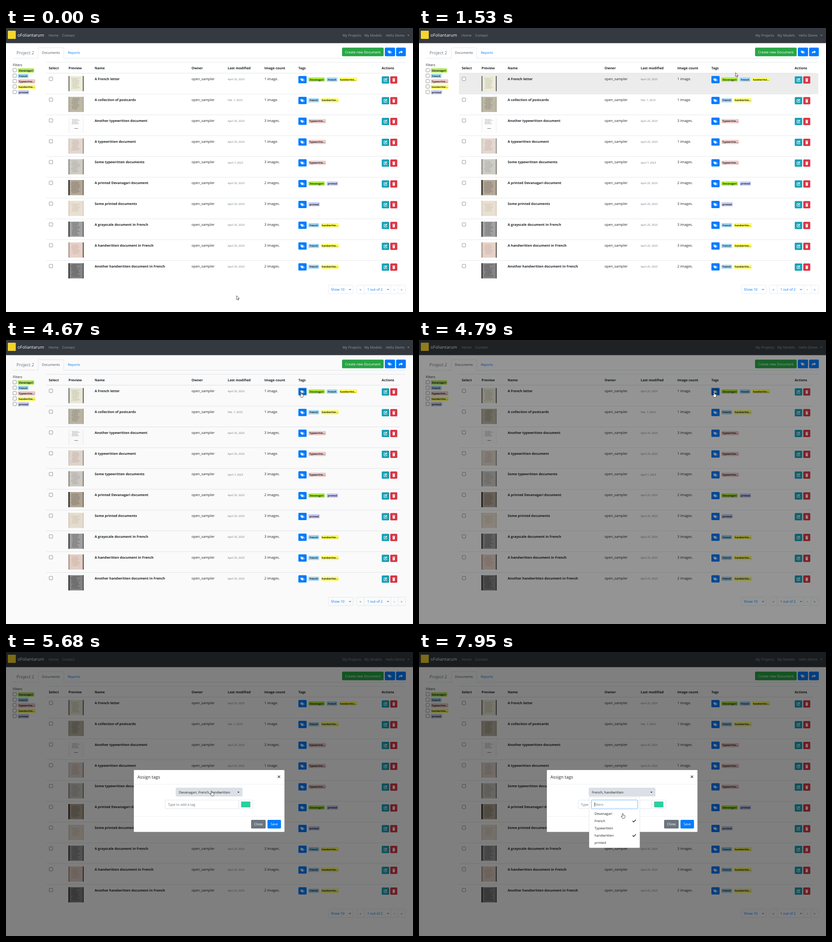
An HTML page for the animation above (8000 ms loop, 895x626 px).

```html
<!DOCTYPE html>
<html lang="en">
<head>
<meta charset="utf-8">
<title>Document list</title>
<style>
html, body { margin: 0; width: 100%; height: 100%; overflow: hidden; background: #fff; }
svg { display: block; width: 895px; height: 626px; font-family: "Open Sans", "Noto Sans", sans-serif; text-rendering: geometricPrecision; }
</style>
</head>
<body>
<svg id="stage" viewBox="0 0 895 626"></svg>
<script>
const LOOP = 8000, ROW_TOP = 99.8, ROW_STEP = 45.85;
const BLUE = '#007bff', INK = '#212529', GREY = '#6c757d', LINE = '#dee2e6';

const TAGS = {
  Devanagari: ['Devanagari', 36, '#ace846'],
  French: ['French', 23.5, '#a2d7f5'],
  Typewritten: ['Typewritte...', 38.5, '#edcaca'],
  handwritten: ['handwritte...', 39, '#fdfd62'],
  printed: ['printed', 25, '#c8cdf5']
};

// title, date, image count, tags, thumbnail [paper, ink, left edge, right edge, first line, last line]
const DOCS = [
  ['A French letter', 'April 25, 2023', 1, ['Devanagari', 'French', 'handwritten'], ['#edecda', '#bdbca4', '#777', '#555', 5, 29]],
  ['A collection of postcards', 'Feb. 7, 2023', 1, ['French', 'handwritten'], ['#bdb7a5', '#8b8677', '#aaa594', '#aaa594', 3, 28]],
  ['Another typewritten document', 'April 25, 2023', 3, ['Typewritten'], ['#fdfdfd', '#aaa', '#f4f4f4', '#f4f4f4', 4, 15]],
  ['A typewritten document', 'April 25, 2023', 1, ['Typewritten'], ['#e3d8cf', '#c3b0aa', '#d3c9c0', '#8f8780', 4, 28]],
  ['Some typewritten documents', 'April 7, 2023', 3, ['Typewritten'], ['#cfccc5', '#aaa9a6', '#8b8983', '#77736d', 4, 29]],
  ['A printed Devanagari document', 'April 25, 2023', 2, ['Devanagari', 'printed'], ['#b3a797', '#7d7469', '#191816', '#6d655c', 4, 29]],
  ['Some printed documents', 'April 25, 2023', 3, ['printed'], ['#e9e0d2', '#cdc1b1', '#d9cdbd', '#d9cdbd', 7, 25]],
  ['A grayscale document in French', 'April 25, 2023', 3, ['French', 'handwritten'], ['#a2a2a2', '#686868', '#343434', '#555', 2, 31]],
  ['A handwritten document in French', 'April 25, 2023', 3, ['French', 'handwritten'], ['#e6d1c7', '#cbb1a8', '#a8948b', '#49423f', 5, 27]],
  ['Another handwritten document in French', 'April 25, 2023', 2, ['French', 'handwritten'], ['#858585', '#515151', '#2d2d2d', '#4a4a4a', 3, 30]]
];

let seed = 7;
const random = () => (seed = seed * 16807 % 2147483647) / 2147483647;

const rect = (x, y, w, h, fill, more = '') =>
  `<rect x="${x}" y="${y}" width="${w}" height="${h}" fill="${fill}" ${more}/>`;
const path = (d, fill, more = '') => `<path d="${d}" fill="${fill}" ${more}/>`;
const stroke = (d, color, width = 1, more = '') => path(d, 'none', `stroke="${color}" stroke-width="${width}" ${more}`);
const text = (x, middle, label, size = 7.6, fill = INK, more = '') =>
  `<text x="${x}" y="${middle + size * 0.36}" font-size="${size}" fill="${fill}" ${more}>${label}</text>`;
const bold = (x, middle, label) => text(x, middle, label, 7.42, INK, 'font-weight="700"');
const centred = (x, middle, label, size, fill) => text(x, middle, label, size, fill, 'text-anchor="middle"');
const at = (x, y, content, more = '') => `<g transform="translate(${x} ${y})" ${more}>${content}</g>`;
const box = (x, y, w, h, more = '') => rect(x, y, w, h, '#fff', `rx="2" stroke="#ced4da" stroke-width=".6" ${more}`);

const tagsIcon = (x, y) => at(x, y,
  path('M-4.5-3h3.2l3.7 3.6-3 3-3.9-3.7z', '#fff') +
  stroke('M.2-3l4 3.8-2.8 2.8', '#fff', 1) +
  '<circle cx="-3" cy="-1.6" r=".7" fill="#007bff"/>');
const editIcon = (x, y) => at(x, y,
  stroke('M1-2.6h-4.2v6.2h6.2v-3', '#fff', 1) + stroke('M-1 1.3l4.4-4.4', '#fff', 1.8));
const trashIcon = (x, y) => at(x, y,
  path('M-3-3.6h2l.5-.7h1l.5.7h2v1h-6zM-2.6-2h5.2l-.4 6h-4.4z', '#fff'));
const shareIcon = (x, y) => at(x, y,
  path('M.5-3.8l4 3.3-4 3.3v-2c-3 0-4 .8-3.9 3-2-3-.8-5.5 3.9-5.6z', '#fff'));
const chevron = (x, y) => stroke(`M${x - 2} ${y - 1}l2 2 2-2`, BLUE, 1.1);
const check = (y, id) => stroke(`M469.6 ${y}l2.4 2.4 4.8-4.9`, INK, 1.5, id ? `id="${id}"` : '');
const checkbox = (x, y) => rect(x, y, 7.6, 7.6, '#fff', 'rx="1.2" stroke="#767676" stroke-width=".8"');

function badge(x, middle, name) {
  const [label, width, color] = TAGS[name];
  return rect(x, middle - 4.6, width, 9.2, color, 'rx="2"') +
    text(x + width / 2, middle, label, 5.5, INK, 'text-anchor="middle" font-weight="700"');
}

function thumbnail(y, [paper, ink, left, right, first, last]) {
  let lines = '';
  for (let row = first; row < last; row += 2) {
    const start = 6 + random() * 4;
    lines += `M${start} ${row}h${(26 - start) * (0.6 + random() * 0.4)}`;
  }
  return at(137.3, y,
    rect(0, 0, 33.5, 33.5, paper) + rect(0, 0, 2.4, 33.5, left) + rect(31.6, 0, 1.9, 33.5, right) +
    stroke(lines, ink, 0.9, 'stroke-dasharray="3 .7 1.8 .6"') +
    (last === 15 ? stroke('M13 24h8', '#777', 1) : ''));
}

function documentRow([title, date, count, tags, thumb], i) {
  const y = ROW_TOP + i * ROW_STEP, middle = y + 12.5;
  let x = 665;
  const badges = tags.map(name => {
    const mark = badge(x, middle + 1.3, name);
    x += TAGS[name][1] + 4.2;
    return mark;
  }).join('');
  return rect(88, y, 790, ROW_STEP, '#ececec', 'class="hover" visibility="hidden"') +
    (i ? stroke(`M88 ${y}H866`, LINE, 0.8) : '') +
    checkbox(95, middle - 4) + thumbnail(y + 6, thumb) +
    bold(195, middle, title) + text(408, middle, 'open_sampler', 7.66) +
    text(487.5, middle + 0.8, date, 5.85, GREY) +
    text(568, middle, count + (count > 1 ? ' images.' : ' image.'), 7.7) +
    rect(643, y + 6, 18, 16, BLUE, `rx="1.6" ${i ? '' : 'id="tagButton"'}`) + tagsIcon(652, y + 14.2) + badges +
    rect(826.3, y + 6.6, 16.4, 16, '#17a2b8', 'rx="1.6"') + editIcon(834.4, y + 14.5) +
    rect(845, y + 6.6, 15.4, 16, '#dc3545', 'rx="1.6"') + trashIcon(852.7, y + 14.8);
}

function page() {
  const headers = [[94, 'Select'], [137.5, 'Preview'], [195, 'Name'], [408, 'Owner'], [487.5, 'Last modified'],
    [568, 'Image count'], [643, 'Tags'], [826, 'Actions']];
  const pale = '#9a9d a0'.replace(' ', '');
  return rect(0, 0, 895, 626, '#fff') + rect(0, 0, 895, 33.4, '#343a40') +
    rect(4, 6, 17.5, 18, '#f7d62c', 'rx="1"') + text(25.5, 15.6, 'oFoliantarum', 9.3, '#fff') +
    text(93.7, 16.3, 'Home', 7.7, pale) + text(123.5, 16.3, 'Contact', 7.7, pale) +
    text(740, 16.3, 'My Projects', 7.6, pale) + text(788, 16.3, 'My Models', 7.6, pale) +
    text(835, 16.3, 'Hello Demo', 7.6, pale) + path('M882.6 15.3h4.4l-2.2 2.3z', pale) +
    stroke('M15 66.5H71V45.5q0-2 2-2H125q2 0 2 2V66.5H879', LINE, 0.8) +
    text(23, 54.7, 'Project 2', 9.5, GREY) + text(79, 54.5, 'Documents', 7.4, '#495057') +
    text(136, 54.5, 'Reports', 7.4, BLUE) +
    rect(739, 43.3, 91.5, 19, '#28a745', 'rx="2"') + centred(784.8, 53, 'Create new Document', 7.5, '#fff') +
    rect(833, 43.3, 22.5, 19, BLUE, 'rx="2"') + tagsIcon(844.2, 53) +
    rect(857.8, 43.3, 21.4, 19, BLUE, 'rx="2"') + shareIcon(868.3, 53.2) +
    text(15, 81.3, 'Filters', 7.4) +
    Object.keys(TAGS).map((name, i) => checkbox(15.3, 89.2 + i * 12) + badge(26, 93.6 + i * 12, name)).join('') +
    stroke('M88 75.5H878', LINE, 0.8) +
    headers.map(([x, label]) => bold(x, 88, label)).join('') +
    stroke(`M88 ${ROW_TOP - 0.3}H866`, LINE, 1) + DOCS.map(documentRow).join('') +
    rect(708.7, 566.8, 54.6, 18.6, '#fff', `rx="2" stroke="${LINE}" stroke-width=".7"`) +
    text(714.5, 576.3, 'Show 10', 7.6, BLUE) + chevron(756.5, 576.3) +
    rect(771, 566.8, 107.5, 18.6, '#fff', `rx="2" stroke="${LINE}" stroke-width=".7"`) +
    stroke('M787.7 567v18M846.2 567v18M862 567v18', LINE, 0.7) +
    centred(779.4, 576, '«', 7.6, BLUE) + text(794.5, 576.3, '1 out of 2', 7.6, BLUE) + chevron(840, 576.3) +
    centred(854, 576, '›', 7.6, BLUE) + centred(870, 576, '»', 7.6, BLUE);
}

function modal() {
  return rect(281, 260, 331.5, 136.7, '#fff', 'rx="1.5" stroke="#000" stroke-opacity=".2" stroke-width=".6"') +
    text(289, 275.3, 'Assign tags', 9.6) +
    stroke('M597.7 272.5l5 5m0-5l-5 5', '#444', 1.2) +
    stroke('M281 291.5H612M281 362.5H612', '#e9ecef', 0.8) +
    rect(373.6, 299.5, 146, 18.5, '#dae0e5', 'id="selectButton" rx="2" stroke="#d3d9df" stroke-width=".6"') +
    text(380, 309.2, 'Devanagari, French, handwritten', 7.45, INK, 'id="selection"') +
    path('M508.8 308h4.6l-2.3 2.4z', INK) +
    box(350, 326.4, 161.7, 19) + text(356, 336, 'Type to add a tag', 7.5, GREY) +
    box(511.7, 326.4, 31.3, 19) + rect(517.5, 330, 19.5, 12, '#1fd6a0', 'stroke="#777" stroke-width=".5"') +
    rect(539, 370, 32, 19, GREY, 'rx="2"') + centred(555, 379.7, 'Close', 7.5, '#fff') +
    rect(575, 370, 29.7, 19, BLUE, 'rx="2"') + centred(589.8, 379.7, 'Save', 7.5, '#fff');
}

function dropdown() {
  return rect(374, 319.8, 111.7, 112, '#fff', 'rx="2" stroke="#000" stroke-opacity=".18" stroke-width=".6"') +
    rect(379.3, 326.4, 101.4, 19, '#fff', 'rx="2" stroke="#bfdeff" stroke-width="2.4"') +
    rect(379.3, 326.4, 101.4, 19, '#fff', 'rx="2" stroke="#80bdff" stroke-width=".8"') +
    text(386, 336.2, 'filters', 7.4, GREY) + stroke('M386.2 331.3v9.6', INK, 0.8, 'id="caret"') +
    Object.keys(TAGS).map((name, i) => text(386, 356.5 + i * 16, name, 7.4)).join('') +
    check(356.3, 'firstCheck') + check(372.3) + check(404.3);
}

const arrow = path('M0 0v8.6l2-1.8 1.4 3.2 1.5-.7-1.4-3h2.7z', '#fff', 'stroke="#111" stroke-width=".7" stroke-linejoin="round"');
const hand = path('M-1 1q1-1.8 2 0v3.2l3.1.6q1.2.4 1.1 1.7l-.5 2.6-1 2.2h-4.2l-3-4.2q-.3-1.5 1.4-.6l1.1 1z', '#fff',
  'stroke="#111" stroke-width=".7" stroke-linejoin="round"');

document.getElementById('stage').innerHTML = page() +
  rect(0, 0, 895, 626, '#000', 'id="backdrop"') +
  `<g id="modal">${modal()}</g><g id="dropdown">${dropdown()}</g>` +
  `<g id="cursor"><g id="arrow">${arrow}</g><g id="hand">${hand}</g></g>`;

const byId = id => document.getElementById(id);
const show = (node, on) => node.setAttribute('visibility', on ? 'visible' : 'hidden');
const hovers = [...document.querySelectorAll('.hover')];
const clamp = v => Math.min(1, Math.max(0, v));

// The screen refreshes only at these moments
const spread = (from, to, count) => Array.from({ length: count }, (_, i) => Math.floor(from + (to - from) * i / (count - 1)));
const TICKS = [0, ...spread(430, 1380, 7), ...spread(1530, 1830, 3), ...spread(2110, 2390, 3), ...spread(2670, 3510, 7),
  ...spread(3820, 4270, 4), 4670, 4790, 4920, 5100, 5240, ...spread(5530, 6550, 8), ...spread(6700, 7650, 7), 7800, 7950];

// time, x, y of the pointer tip
const POINTER = [[0, 507, 590], [300, 507, 590], [900, 590, 330], [1380, 682, 78], [1530, 696, 98.5], [1830, 664, 112],
  [1970, 664, 112], [2390, 231, 122], [2550, 231, 122], [3080, 204, 109.5], [3230, 204, 109.5], [3510, 565, 118],
  [3700, 565, 118], [4270, 649, 115], [5100, 649, 115], [5240, 500, 282], [5400, 500, 282], [5700, 448, 308],
  [5970, 448, 308], [6500, 448, 365], [6710, 448, 365], [7170, 446, 388], [7650, 448, 355.5], [LOOP, 448, 355.5]];

function pointerAt(t) {
  const next = Math.max(1, POINTER.findIndex(key => key[0] > t));
  const [t0, x0, y0] = POINTER[next - 1], [t1, x1, y1] = POINTER[next];
  const p = (t - t0) / (t1 - t0);
  return [x0 + (x1 - x0) * p, y0 + (y1 - y0) * p];
}

function draw(now) {
  const elapsed = now % LOOP;
  const t = TICKS.findLast(tick => tick <= elapsed);
  const [x, y] = pointerAt(t);
  const within = (left, top, right, bottom) => x >= left && x <= right && y >= top && y <= bottom;
  const opening = t >= 4670, listOpen = t >= 5960, edited = t >= 7800;

  const hovered = opening || x < 88 || x > 878 ? -1 : Math.floor((y - ROW_TOP + 2) / ROW_STEP);
  hovers.forEach((node, i) => show(node, i === hovered));

  const overTag = within(643, 105, 661, 122), focused = opening && t < 5240;
  const tagButton = byId('tagButton');
  tagButton.setAttribute('fill', overTag ? '#0062cc' : BLUE);
  tagButton.setAttribute('stroke', focused ? '#80bdff' : 'none');
  tagButton.setAttribute('stroke-width', 1.6);

  byId('backdrop').setAttribute('opacity', 0.5 * clamp((t - 4664) / 150));
  const modalNode = byId('modal');
  modalNode.setAttribute('opacity', clamp((t - 4815) / 150));
  modalNode.setAttribute('transform', `translate(0 ${-25 * (1 - clamp((t - 4820) / 300))})`);

  const overSelect = opening && within(374, 299, 520, 318);
  byId('selectButton').setAttribute('opacity', overSelect || listOpen ? 1 : 0);
  byId('selection').textContent = (edited ? '' : 'Devanagari, ') + 'French, handwritten';
  show(byId('dropdown'), listOpen);
  show(byId('firstCheck'), listOpen && !edited);
  show(byId('caret'), listOpen && Math.floor((t - 5746) / 530) % 2 === 0);

  const overTitle = !opening && within(195, 107, 251, 118);
  const pointing = overTitle || overTag || overSelect || listOpen;
  byId('cursor').setAttribute('transform', `translate(${x} ${y})`);
  show(byId('hand'), pointing);
  show(byId('arrow'), !pointing);
}

const begin = performance.now();
function frame() {
  draw(performance.now() - begin);
  requestAnimationFrame(frame);
}
frame();
</script>
</body>
</html>
```
